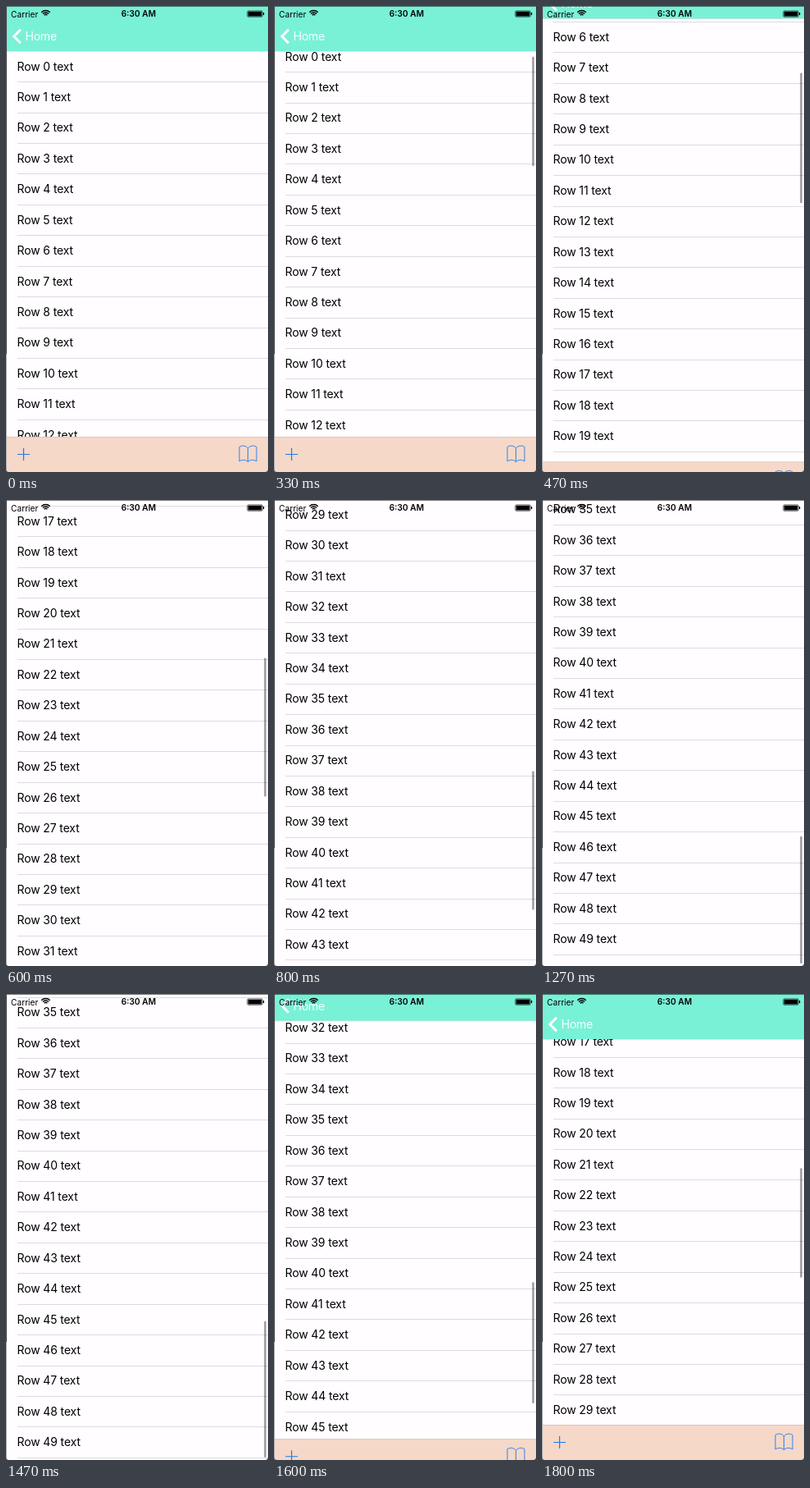
Write an HTML page with a canvas that moves like this. It is 320 by 568 pixels and loops after 1870 ms.

```html
<!DOCTYPE html>
<html lang="en">
<head>
<meta charset="utf-8">
<title>List with hiding bars</title>
<style>
  html, body { margin: 0; width: 100%; height: 100%; overflow: hidden; }
  canvas { display: block; }
</style>
</head>
<body>
<canvas id="stage" width="320" height="568"></canvas>
<script>
const W = 320, H = 568, LOOP = 1870, STEP = 200 / 3, STEPS = 28;
const ROWS = 50, ROW_H = 37.42, LIST_TOP = 55.3, NAV_H = 55, TOOL_H = 43;
const LIST_H = ROWS * ROW_H;
const MAX_SCROLL = LIST_TOP + LIST_H - H;
const DRAG_UP = [0, 1, 3, 6, 9, 12, 70];
const DRAG_DOWN = [1335, 1230, 1045, 840, 651.6];
const FONT = 'Inter, "Liberation Sans", sans-serif';
const BLUE = '#1f7aee', HAIRLINE = 'rgba(0,0,0,.15)';
const ctx = document.getElementById('stage').getContext('2d');

const mix = (a, b, p) => a + (b - a) * p;
function ease(k, from, to) {
  const u = Math.min(1, Math.max(0, (k - from) / (to - from)));
  return u * u * (3 - 2 * u);
}

// Drag, decelerating flick, bounce at the end, then a swipe back.
function scrollAt(k) {
  if (k < 7) return DRAG_UP[k];
  if (k < 14) return 684 + 1384 * (1 - 0.875 ** (k - 9));
  if (k < 23) return MAX_SCROLL + 91 * (k - 14) * Math.exp(-0.7 * (k - 14));
  return DRAG_DOWN[k - 23];
}

// 1 = both bars in place, 0 = both off screen
const barsAt = k => 1 - ease(k, 5.2, 8) + ease(k, 22.3, 25.3);

function box(color, x, y, w, h) {
  ctx.fillStyle = color;
  ctx.fillRect(x, y, w, h);
}

function text(str, x, y, size, color = '#000', weight = 400, spacing = 0) {
  ctx.font = `${weight} ${size}px ${FONT}`;
  ctx.letterSpacing = spacing + 'px';
  ctx.fillStyle = color;
  ctx.fillText(str, x, y);
}

function stroke(path, color, width) {
  ctx.strokeStyle = color;
  ctx.lineWidth = width;
  ctx.stroke(new Path2D(path));
}

function drawRows(scroll) {
  for (let i = 0; i < ROWS; i++) {
    const top = LIST_TOP + i * ROW_H - scroll;
    if (top < -ROW_H || top > H) continue;
    text(`Row ${i} text`, 13.5, Math.floor(top + 23.8), 14, '#000', 400, -0.13);
    box('#dddbe0', 14, Math.floor(top + ROW_H), W - 14, 1);
  }
}

function drawIndicator(scroll, bars) {
  if (scroll <= 0) return;
  const start = mix(0, -LIST_TOP, bars);
  const end = LIST_H - H + mix(0, TOOL_H, bars);
  const offset = scroll - LIST_TOP;
  const over = Math.max(0, offset - end);
  const track = mix(562, 463, bars), length = mix(169, 133.5, bars);
  const part = Math.min(1, (offset - start) / (end - start));
  const y = mix(3, 59, bars) + part * (track - length) + over;
  ctx.fillStyle = 'rgba(0,0,0,.4)';
  ctx.beginPath();
  ctx.roundRect(315.3, y, 2.4, length - over, 1.2);
  ctx.fill();
}

function drawNavBar(bars) {
  ctx.save();
  ctx.translate(0, -(NAV_H + 1) * (1 - bars));
  box('#79f1d6', 0, 0, W, NAV_H);
  box(HAIRLINE, 0, NAV_H, W, 0.6);
  stroke('M17.8 28.8 L9.8 37 L17.8 45.2', '#fff', 3);
  text('Home', 23.5, 42, 14.2, '#f4fffc', 400, -0.35);
  ctx.restore();
}

function drawToolbar(bars) {
  ctx.save();
  ctx.translate(0, TOOL_H * (1 - bars));
  box('#f5d8c8', 0, H - TOOL_H, W, TOOL_H);
  box(HAIRLINE, 0, H - TOOL_H, W, 0.6);
  stroke('M14 546.5 H29 M21.5 539 V554', BLUE, 1.2);
  stroke('M295.5 539 C293 535.7 288 535.2 285 537.5 V555 C288 552.7 293 552.7 295.5 555.7 ' +
         'C298 552.7 303 552.7 306 555 V537.5 C303 535.2 298 535.7 295.5 539 V555.7', BLUE, 0.9);
  ctx.restore();
}

function drawStatus() {
  text('Carrier', 6, 13.5, 10.2);
  text('6:30 AM', 140.8, 13.4, 10.2, '#000', 600);
  for (const r of [2.6, 5, 7.4]) {
    ctx.beginPath();
    ctx.arc(48.5, 13, r, -Math.PI * 0.75, -Math.PI * 0.25);
    ctx.lineWidth = 1.5;
    ctx.strokeStyle = '#000';
    ctx.stroke();
  }
  ctx.lineWidth = 0.6;
  ctx.beginPath();
  ctx.roundRect(294.7, 5.9, 18.6, 7.4, 1.5);
  ctx.stroke();
  box('#000', 295.6, 6.7, 16.8, 5.8);
  box('#000', 314, 8, 1.2, 3);
}

function drawEdges() {
  box('rgba(0,0,0,.5)', 0, 0, W, 1);
  box('#b5b5b7', 0, 424, 1, H - 424);
  box('#4c4c4e', 0, 0, 1, 424);
  ctx.fillStyle = '#555';
  ctx.fill(new Path2D('M0 564 Q0 568 4 568 H0 Z M320 564 Q320 568 316 568 H320 Z'));
}

const began = performance.now();
function frame() {
  const t = (performance.now() - began) % LOOP;
  const k = Math.min(STEPS - 1, Math.floor((t + 4) / STEP));
  const scroll = scrollAt(k), bars = barsAt(k);
  box('#fffdff', 0, 0, W, H);
  drawRows(scroll);
  drawNavBar(bars);
  drawToolbar(bars);
  drawIndicator(scroll, bars);
  drawStatus();
  drawEdges();
  requestAnimationFrame(frame);
}
frame();
</script>
</body>
</html>
```
